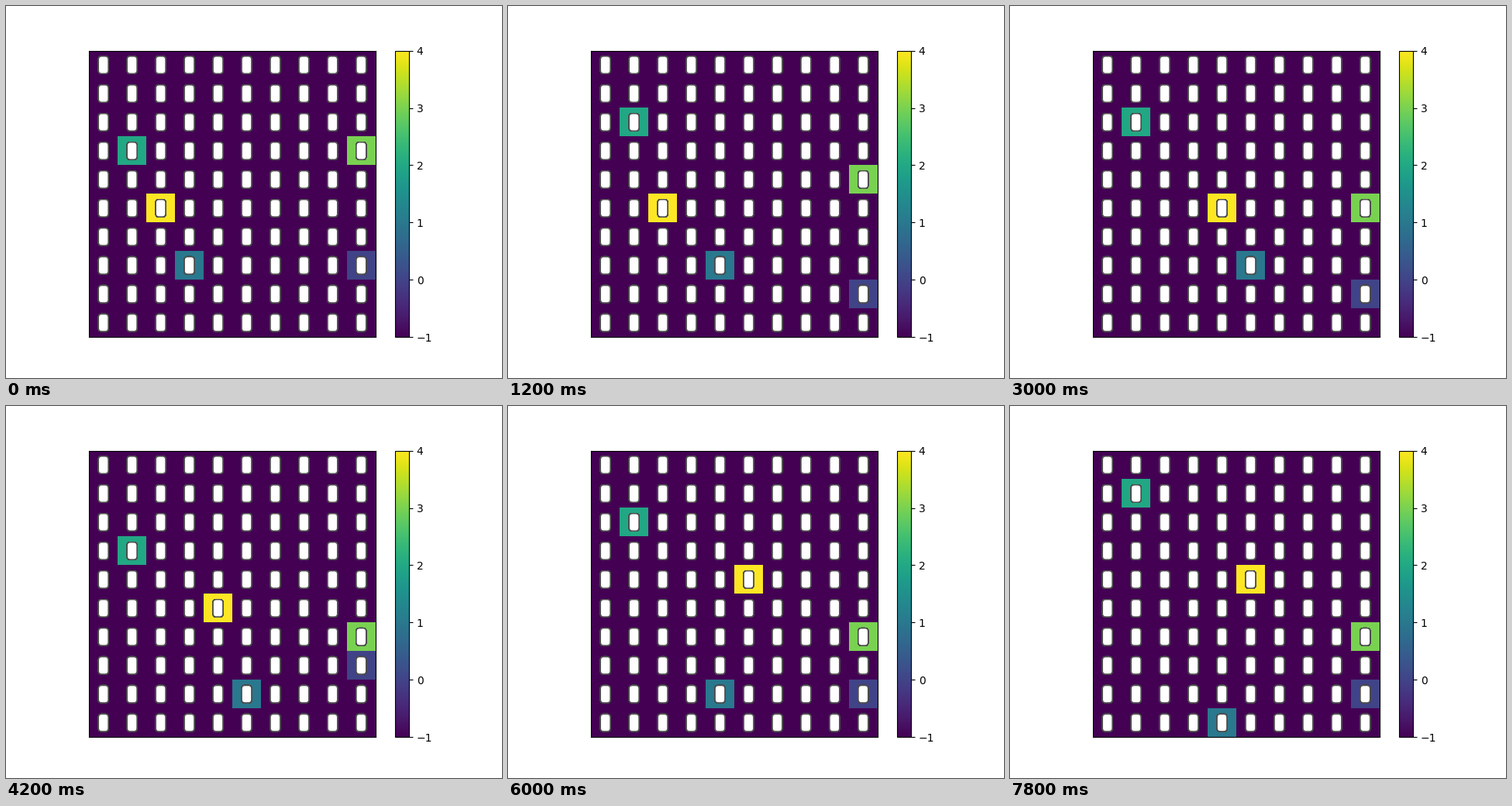
Animation, 640 px wide and 480 px high, one loop 8000 ms. Source, as a matplotlib script:

```python
import numpy as np
import matplotlib.pyplot as plt
from matplotlib.animation import FuncAnimation
from matplotlib.collections import PathCollection
from matplotlib.path import Path
from matplotlib.transforms import Affine2D

SIZE = 10
INTERVAL = 100
FRAMES = 80
FRAMES_PER_TURN = 3
LAYERS = 30

# (row, col) of each agent; the agents take turns, one step at a time
START = [(7, 9), (7, 3), (3, 1), (3, 9), (5, 2)]
STEPS = {"U": (-1, 0), "D": (1, 0), "L": (0, -1), "R": (0, 1), ".": (0, 0)}
ROUNDS = ["DRUDR", ".R.DR", "UDDDU", "DLU.R", "UDU..", "D"]
MOVES = "".join(ROUNDS)


def grid_after(turns):
    pos = np.array(START)
    for k, move in enumerate(MOVES[:turns]):
        pos[k % len(START)] += STEPS[move]
    grid = np.full((SIZE, SIZE), -1)
    grid[pos[:, 0], pos[:, 1]] = np.arange(len(START))
    return grid


def label_outline():
    """Outline of a blank boxed label at cell (0, 0), in data units."""
    label = ax.text(0, 0, " ", ha="center", va="center",
                    bbox=dict(boxstyle="round"))
    fig.canvas.draw()
    box = label.get_bbox_patch()
    to_data = box.get_transform() + ax.transData.inverted()
    outline = to_data.transform_path(box.get_path())
    label.remove()
    return outline


fig, ax = plt.subplots(figsize=(6.4, 4.8), dpi=100)
image = ax.imshow(grid_after(0), cmap="viridis", vmin=-1, vmax=4)
fig.colorbar(image, ax=ax)
ax.set_xticks([])
ax.set_yticks([])

# Blank labels stacked many deep, which hardens their smoothed edges
outline = label_outline()
labels = Path.make_compound_path(*[
    Affine2D().translate(col, row).transform_path(outline)
    for row, col in np.ndindex(SIZE, SIZE)])
ax.add_collection(
    PathCollection([labels] * LAYERS, transform=ax.transData, zorder=3,
                   facecolor="white", edgecolor="0.3", linewidth=1),
    autolim=False)


def update(frame):
    image.set_data(grid_after(frame // FRAMES_PER_TURN))
    return [image]


anim = FuncAnimation(fig, update, frames=FRAMES, interval=INTERVAL,
                     repeat=True, repeat_delay=0)
plt.show()
```
